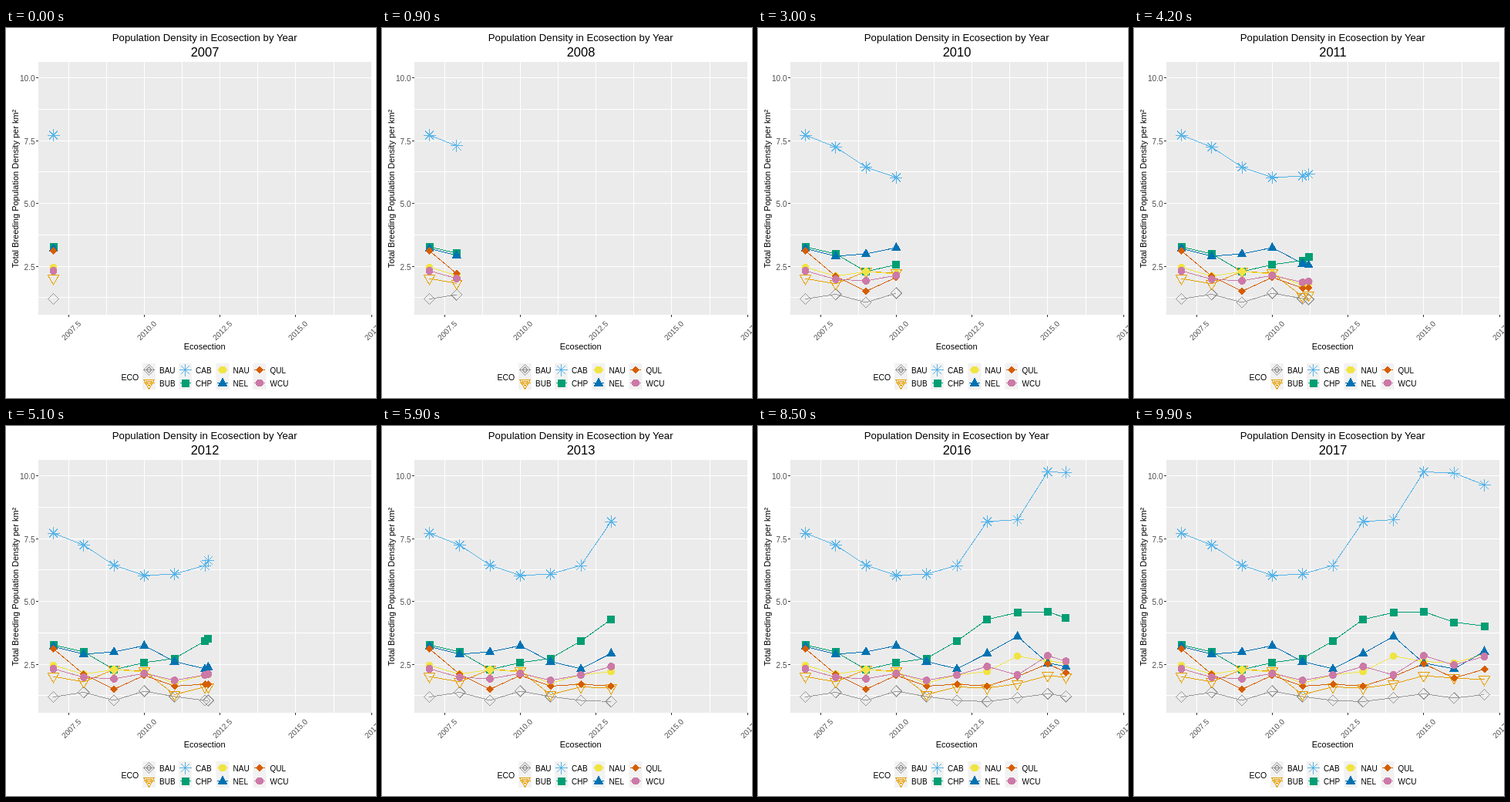
An HTML page for the animation above (10000 ms loop, 480 by 480 pixels).

```html
<!DOCTYPE html>
<html lang="en">
<head>
<meta charset="utf-8">
<style>
html, body { margin: 0; width: 100%; height: 100%; overflow: hidden; background: #fff; }
svg { display: block; font: 10px "Liberation Sans", Arial, sans-serif; }
path { stroke-width: 1; shape-rendering: crispEdges; }
</style>
</head>
<body>
<svg id="chart" width="480" height="480" viewBox="0 0 480 480"></svg>
<script>
// Each series: name, colour, marker, yearly heights in pixels from 2007 to 2017
const series = [
  ['BAU', '#999999', 'rhomb', [351.5, 345.5, 356, 344, 351, 356, 357.5, 352.5, 347.5, 353, 348.5]],
  ['BUB', '#E69F00', 'down', [325, 332, 316, 318, 348.5, 338.5, 340, 334.5, 324, 327, 329]],
  ['CAB', '#56B4E9', 'star', [139, 154.5, 180.5, 194, 192, 181, 124, 121.5, 59.5, 61, 76.5]],
  ['CHP', '#009E73', 'square', [284, 293, 316, 307, 301.5, 279, 251, 242, 241, 254.5, 259.5]],
  ['NAU', '#F0E442', 'dot', [310.5, 322, 316, 319, 333.5, 323, 318.5, 298.5, 305.5, 307.5, 296]],
  ['NEL', '#0072B2', 'up', [286, 296, 293, 285, 305.5, 315, 295, 273, 307.5, 315, 292.5]],
  ['QUL', '#D55E00', 'gem', [289, 322, 341.5, 323.5, 337.5, 335, 337.5, 325, 308.5, 327, 315.5]],
  ['WCU', '#CC79A7', 'dot', [315, 326, 328, 321, 330, 323, 312, 323, 298, 310, 299]]
];

const diamond = r => `M${-r} 0L0 ${-r} ${r} 0 0 ${r}Z`;
const shapes = {
  rhomb: s => diamond(7.1 * s),
  down: s => `M${-7 * s} ${-4.2 * s}H${7 * s}L0 ${8 * s}Z`,
  star: s => `M${-8 * s} 0H${8 * s}M0 ${-8 * s}V${8 * s}` +
    `M${-5.6 * s} ${-5.6 * s}L${5.6 * s} ${5.6 * s}M${-5.6 * s} ${5.6 * s}L${5.6 * s} ${-5.6 * s}`,
  square: () => 'M-5-5H5V5H-5Z',
  dot: () => 'M-5 0A5 5 0 0 1 5 0A5 5 0 0 1-5 0Z',
  up: () => 'M-6.2 4L0-7.2 6.2 4Z',
  gem: () => diamond(5)
};
const hollow = ['rhomb', 'down', 'star'];

function marker(kind, color, x, y, scale = 1) {
  const paint = hollow.includes(kind) ? `fill="none" stroke="${color}"` : `fill="${color}"`;
  return `<path d="${shapes[kind](scale)}" transform="translate(${x} ${y})" ${paint}/>`;
}
const line = (d, color) => `<path d="${d}" fill="none" stroke="${color}"/>`;
const rect = (x, y, w, h, color) => `<rect x="${x}" y="${y}" width="${w}" height="${h}" fill="${color}"/>`;
const text = (x, y, str, attrs = '') => `<text x="${x}" y="${y}" ${attrs}>${str}</text>`;
const snap = v => Math.floor(v) + 0.5;
const yearX = n => 61.5 + 39.3 * n;

function backdrop() {
  let out = rect(42, 44, 432, 328, '#EBEBEB');
  for (let i = 0; i < 8; i++) {
    const x = snap(yearX(0.5 + 1.25 * i)), y = snap(64.5 + 40.75 * i);
    out += line(`M${x} 44V372M42 ${y}H474`, '#fff');
  }
  for (let i = 0; i < 4; i++) {
    const y = snap(64.5 + 81.5 * i);
    out += line(`M39 ${y}H42`, '#333') +
      text(37.5, y + 4, (10 - 2.5 * i).toFixed(1), 'text-anchor="end" fill="#4D4D4D"');
  }
  for (let i = 0; i < 5; i++) {
    const x = snap(yearX(0.5 + 2.5 * i));
    out += line(`M${x} 372V375`, '#333') + text(0, 0, (2007.5 + 2.5 * i).toFixed(1),
      `transform="translate(${x + 3} 392.5) rotate(-45)" dy=".36em" text-anchor="middle" fill="#4D4D4D"`);
  }
  const mid = 'text-anchor="middle"';
  out += text(257.7, 17, 'Population Density in Ecosection by Year', mid + ' font-size="13.2"');
  out += text(257.7, 417, 'Ecosection', mid + ' font-size="11"');
  out += text(0, 0, 'Total Breeding Population Density per km²',
    mid + ' font-size="11" transform="translate(15.5 208.5) rotate(-90)"');
  return out;
}

function legend() {
  let out = text(149.5, 457, 'ECO', 'font-size="10.5"');
  series.forEach(([name, color, kind], i) => {
    const x = [185.5, 232.5, 281, 329][i >> 1], y = i % 2 ? 460.5 : 443.5;
    out += rect(x - 8.5, y - 8.5, 17, 17, '#F2F2F2') +
      line(`M${x - 7} ${y}H${x + 7}`, color) + marker(kind, color, x, y);
    if (hollow.includes(kind)) out += marker(kind, color, x, y, 0.5);
    out += text(x + 13.5, y + 4, name);
  });
  return out;
}

chart.innerHTML = backdrop() + '<g id="plot"></g>' + legend() +
  text(258, 37, '', 'id="year" text-anchor="middle" font-size="16.5"');
const plot = document.getElementById('plot'), year = document.getElementById('year');

// Every year begins on a whole step of the 100-step loop
const starts = Array.from({ length: 11 }, (_, n) => Math.round(9.9 * n));

function draw(step) {
  const last = starts.filter(s => s <= step).length - 1;
  const part = last < 10 ? (step - starts[last]) / (starts[last + 1] - starts[last]) : 0;
  let lines = '', marks = '';
  for (const [, color, kind, ys] of series) {
    const points = ys.slice(0, last + 1).map((y, n) => [yearX(n), y]);
    if (part) points.push([yearX(last + part), ys[last] + part * (ys[last + 1] - ys[last])]);
    lines += line('M' + points.join('L'), color);
    marks += points.map(([x, y]) => marker(kind, color, x, y)).join('');
  }
  plot.innerHTML = lines + marks;
  year.textContent = Math.round(2007 + step * 10 / 99);
}

let shown = -1;
const begin = performance.now();
function tick() {
  const step = Math.floor((performance.now() - begin) / 100) % 100;
  if (step !== shown) draw(shown = step);
  requestAnimationFrame(tick);
}
tick();
</script>
</body>
</html>
```
